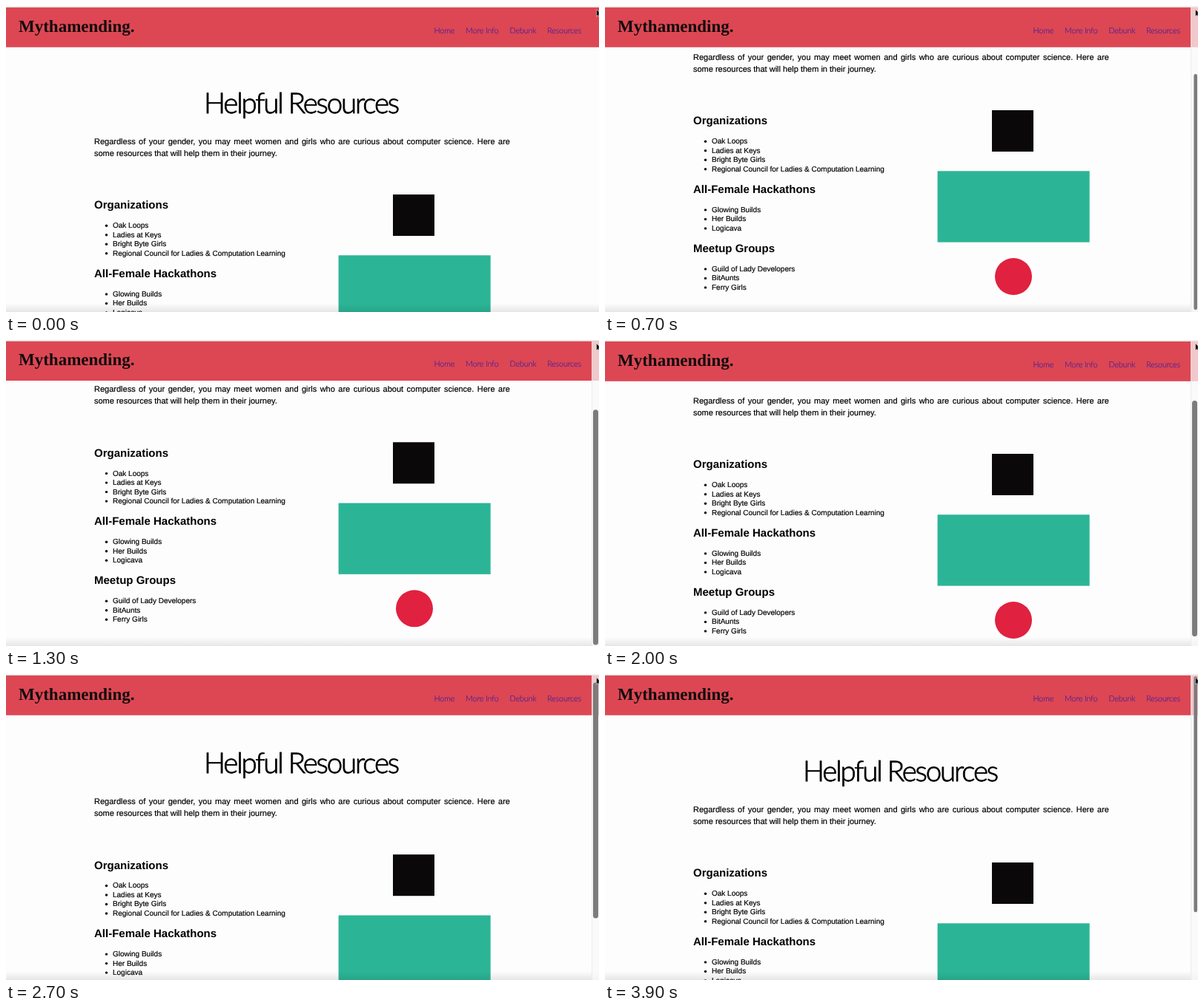
Write an HTML page that moves like this. It is 800 px wide and 414 px high and loops after 4 s.

```html
<!DOCTYPE html>
<html lang="en">
<head>
<meta charset="utf-8">
<title>Helpful Resources</title>
<style>
  html, body { margin: 0; width: 100%; height: 100%; overflow: hidden; background: #fefdfe; }
  svg { display: block; width: 800px; height: 414px; }
  text, p { font-family: "Liberation Sans", Arial, sans-serif; fill: #000; text-rendering: geometricPrecision; }
  p { margin: 0; font-size: 11px; line-height: 16px; text-align: justify; color: #000; -webkit-text-stroke: .18px #000; }
  .brand { font: bold 23px "Liberation Serif", "Times New Roman", serif; fill: #100c0d; }
  .nav text { font: 300 10.8px Lato, sans-serif; letter-spacing: -.14px; fill: #45209a; stroke: #45209a; stroke-width: .15; }
  .title { font: 300 38.5px Lato, sans-serif; letter-spacing: -2.2px; stroke: #000; stroke-width: .8; }
  .head { font-size: 15px; font-weight: bold; }
  .item { font-size: 10px; stroke: #000; stroke-width: .18; }
</style>
</head>
<body>
<svg viewBox="0 0 800 414">
  <defs>
    <linearGradient id="shade" x1="0" y1="0" x2="0" y2="1">
      <stop offset="0" stop-color="#000" stop-opacity="0"/>
      <stop offset="1" stop-color="#000" stop-opacity=".09"/>
    </linearGradient>
  </defs>
  <rect width="800" height="414" fill="#fefdfe"/>

  <g id="page">
    <text class="title" x="398" y="145.3" text-anchor="middle">Helpful Resources</text>
    <foreignObject x="119" y="175.7" width="561" height="40">
      <p>Regardless of your gender, you may meet women and girls who are curious about computer science. Here are some resources that will help them in their journey.</p>
    </foreignObject>
    <g id="lists"></g>
    <rect x="522" y="255" width="56" height="56" fill="#0b0809"/>
    <rect x="448.6" y="337.3" width="205.1" height="96.3" fill="#2bb596"/>
    <circle cx="551" cy="480" r="25" fill="#e0213f"/>
  </g>

  <rect y="402" width="800" height="12" fill="url(#shade)"/>
  <rect width="800" height="4" fill="#f1eff0"/>
  <g id="header">
    <rect y="1.7" width="800" height="54.1" fill="#dc4753"/>
    <text class="brand" x="17" y="35.2">Mythamending.</text>
    <g class="nav">
      <text x="577.5" y="37">Home</text>
      <text x="620" y="37">More Info</text>
      <text x="679.5" y="37">Debunk</text>
      <text x="730" y="37">Resources</text>
    </g>
  </g>
  <rect width="800" height="1.7" fill="#f1eff0"/>

  <g id="bar">
    <rect x="790" y="1.7" width="10" height="413" fill="#fafafa" fill-opacity=".72"/>
    <rect x="790" y="1.7" width=".6" height="413" fill="#e4e2e3"/>
    <rect id="thumb" fill="#7d7b7c"/>
  </g>
  <path d="M796.5 4.8V14L798.6 12.2L800 15V8Z" fill="#000" stroke="#fff" stroke-width=".5"/>
</svg>
<script>
const LOOP = 4000, STEP = 100, BOTTOM = 115.9;
const $ = id => document.getElementById(id);

const groups = [
  [274.4, "Organizations", ["Oak Loops", "Ladies at Keys", "Bright Byte Girls",
    "Regional Council for Ladies & Computation Learning"]],
  [367, "All-Female Hackathons", ["Glowing Builds", "Her Builds", "Logicava"]],
  [447, "Meetup Groups", ["Guild of Lady Developers", "BitAunts", "Ferry Girls"]]
];

function add(tag, attrs, text = "") {
  const el = document.createElementNS("http://www.w3.org/2000/svg", tag);
  for (const k in attrs) el.setAttribute(k, attrs[k]);
  el.textContent = text;
  $("lists").append(el);
}

for (const [y, head, items] of groups) {
  add("text", { class: "head", x: 119, y }, head);
  items.forEach((name, i) => {
    const base = y + 25.9 + i * 12.5;
    add("circle", { cx: 135.5, cy: base - 3, r: 1.7 });
    add("text", { class: "item", x: 144, y: base }, name);
  });
}

// [time, scroll offset]; values past either end are elastic overscroll
const keys = [[0, 0], [100, 4], [200, 22], [300, 50], [400, 76], [500, 95], [600, 107],
  [700, 114], [900, 117.5], [1300, 116.7], [1800, 115.9], [1900, 113], [2000, 101],
  [2100, 80], [2200, 57], [2300, 38], [2400, 26], [2500, 18], [2700, 10.8], [3000, 9],
  [3100, 6], [3200, 1], [3300, -3], [3400, -2], [3500, -1.3], [3900, 0], [4000, 0]];

function scrollAt(t) {
  const i = keys.findIndex(k => k[0] > t);
  const [t0, a] = keys[i - 1], [t1, b] = keys[i];
  return a + (b - a) * (t - t0) / (t1 - t0);
}

const move = (id, y) => $(id).setAttribute("transform", `translate(0 ${y})`);

function draw(now) {
  const t = Math.floor(now % LOOP / STEP) * STEP;
  const s = scrollAt(t);
  const over = s < 0 ? s : Math.max(0, s - BOTTOM);
  move("page", -s);
  move("header", -over);

  $("bar").style.display = t < 100 ? "none" : "";
  const wide = t >= 1000 && t < 3200;
  const w = wide ? 7 : 4.6;
  const top = 3.2 + Math.max(0, s) * .78;
  const end = Math.min(413, top + 319 - Math.abs(over));
  const box = { x: 799 - w, y: top, width: w, height: end - top, rx: w / 2 };
  for (const k in box) $("thumb").setAttribute(k, box[k]);
}

function tick() {
  draw(performance.now());
  requestAnimationFrame(tick);
}
tick();
</script>
</body>
</html>
```
